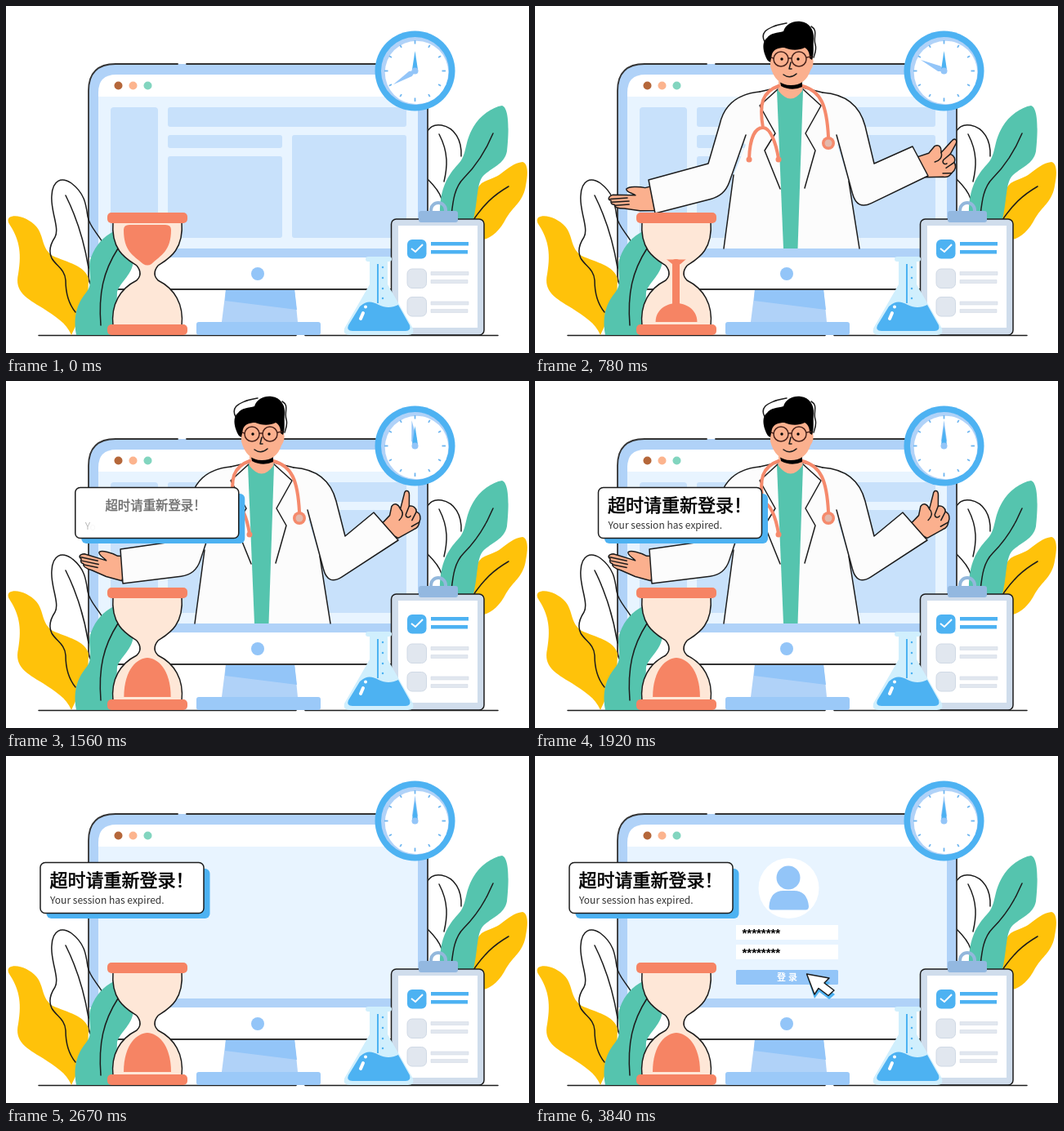
These frames come from a looping animation (640x425 px, 4.5 s). An HTML page:

```html
<!DOCTYPE html>
<html lang="zh">
<head>
<meta charset="utf-8">
<title>Session expired</title>
<style>
html,body{margin:0;width:100%;height:100%;overflow:hidden;background:#fff}
svg{display:block;width:640px;height:425px}
.ink{fill:none;stroke:#1c1c1c;stroke-width:1.5;stroke-linecap:round;stroke-linejoin:round}
.cjk{font-family:"Noto Sans CJK SC","Noto Sans CJK",sans-serif}
.sky{fill:#4db2f2}.soft{fill:#93c5f8}.pale{fill:#b0d2f8}.panel{fill:#c8e1fb}
.teal{fill:#55c4ae}.gold{fill:#ffc20a}.coral{fill:#f68464}.grey{fill:#e1e7ef}
.skin{fill:#fbb08e}
.tube{fill:none;stroke:#f58a6c;stroke-width:4;stroke-linecap:round}
</style>
</head>
<body>
<svg viewBox="0 0 640 425">
<defs>
  <clipPath id="upper"><rect id="level" x="140" y="268" width="70" height="60"/></clipPath>
</defs>

<!-- right plants -->
<path class="ink" d="M516 153C520 146 527 145 533 146C549 149 558 164 557 184M516 212C522 218 530 226 533 236"/>
<path class="ink" d="M530 157C542 180 540 198 536 215"/>
<path class="gold" d="M632 191C639 193 639 205 636 220C633 240 620 246 612 260C605 274 595 284 584 286L566 264C572 240 572 226 582 217C592 211 599 211 606 205C614 199 622 192 632 191Z"/>
<path class="ink" d="M615 221C596 232 584 244 572 262"/>
<path class="teal" d="M607 122C617 125 615 160 613 178C610 194 594 198 584 208C575 218 578 242 571 264L531 258C530 225 540 208 553 194C565 182 560 168 572 148C580 134 595 124 607 122Z"/>
<path class="ink" d="M596 156C586 180 574 197 560 211C549 222 547 238 545 256"/>

<!-- monitor -->
<path class="ink" stroke-linecap="butt" d="M40 403.500H355M366 403.500H602"/>
<path fill="#b0d2f8" d="M264 387L269 347H353L357 387Z"/>
<path class="soft" d="M268 361L269 347H353L356 372Z"/>
<rect fill="#9bc9f8" x="233" y="387" width="152" height="16" rx="3"/>
<path class="pale" d="M101 330V104Q101 71 134 71H483Q516 71 516 104V330Q516 347 499 347H118Q101 347 101 330Z"/>
<path fill="#fff" d="M101 308H516V330Q516 347 499 347H118Q101 347 101 330Z"/>
<path class="ink" style="stroke:#333;stroke-width:1.8" d="M210 71H134Q101 71 101 104V330Q101 347 118 347H499Q516 347 516 330V104Q516 71 483 71H221"/>
<path fill="#fff" d="M113 112V106Q113 84 135 84H482Q504 84 504 106V112Z"/>
<rect fill="#e8f4ff" x="113" y="111" width="391" height="186"/>
<circle cx="137.500" cy="97.500" r="5" fill="#b5673a"/><circle cx="155.500" cy="97.500" r="5" fill="#fcb48e"/><circle cx="173.500" cy="97.500" r="5" fill="#82d5bf"/>
<circle class="soft" cx="308" cy="328" r="8"/>
<g id="panels" class="panel">
  <rect x="128" y="124" width="58" height="160" rx="4"/>
  <rect x="198" y="124" width="292" height="24" rx="3"/>
  <rect x="198" y="158" width="140" height="16" rx="3"/>
  <rect x="198" y="184" width="140" height="100" rx="3"/>
  <rect x="350" y="158" width="140" height="126" rx="3"/>
</g>

<!-- left plants -->
<path class="gold" d="M4 259C12 254 28 260 37 270C47 282 43 297 57 306C75 314 97 318 101 334L100 360L80 403C74 388 60 380 45 370C25 358 10 350 15 328C20 300 15 284 4 267Q1 262 4 259Z"/>
<path class="ink" d="M121 294C112 278 102 270 100 258C98 244 97 230 80 217C68 209 57 213 56 232C54 250 66 272 60 283C54 292 52 301 56 309C62 319 72 322 73 336C73 352 76 364 85 375"/>
<path class="ink" d="M73 232C86 258 96 290 101 321"/>
<path class="teal" d="M132 276C150 268 158 292 156 312C154 330 142 335 136 350L134 403H86C81 376 90 361 98 351C109 338 98 322 104 308C110 292 120 282 132 276Z"/>
<path class="ink" d="M137 297C119 325 113 352 116 391"/>

<!-- doctor -->
<g id="doctor">
  <path fill="#fcfcfc" d="M298 99L275 105Q238 114 228 142L258 170L243 207L231 297H397L384 215L370 170L402 142Q392 116 352 106L327 99Z"/>
  <path class="ink" d="M275 105L297 100M352 106L328 100M243 207L231 297M384 215L397 297"/>
  <path class="teal" d="M296 103H328L321.500 297H304Z"/>
  <g id="handL"></g><g id="handR"></g>
  <path id="armL" class="ink" style="fill:#fcfcfc"/><path id="armR" class="ink" style="fill:#fcfcfc"/>
  <path class="ink" d="M297 102L275 122L294 156L281 177L300 224M328 102L350 122L331 156L343 177L330 223"/>
  <path class="skin" d="M298 86V104Q313 123 327 104V86Z"/>
  <path class="tube" d="M298 98C278 105 274 120 279 149M262 187C263 160 270 149 279 149C288 149 295 168 298 187M327 98C350 104 357 122 359 160"/>
  <circle cx="262" cy="188" r="3.500" fill="#f58a6c"/><circle cx="298" cy="188" r="3.500" fill="#f58a6c"/>
  <circle cx="359" cy="168" r="8" fill="#f58a6c"/><circle cx="359" cy="168" r="4.500" fill="#e3b9ac"/>
  <g id="head">
    <path d="M300 93H327V99Q314 105 301 98Z"/>
    <path class="skin" d="M288 46V74Q294 97 313 97Q331 97 337 79Q342 72 340 64L338 46Z"/>
    <path d="M285 67C280 59 276 45 284 39C288 33 297 33 304 31C307 22 316 18 325 19C336 20 342 30 341 40C340 50 342 57 339 66L336 64C336 57 334 53 330 51C322 55 312 54 305 51C298 51 292 53 290 59L288 69Z"/>
    <path class="ink" d="M281 44C275 32 285 28 292 25C298 22 303 22 308 21M338 25C347 30 340 38 343 47C345 54 342 59 341 63"/>
    <g class="ink" style="stroke:#4a241c"><circle cx="301" cy="65" r="9"/><circle cx="323" cy="65" r="9"/><path d="M310 64H314M332 63L338 62M292 64L289 63"/></g>
    <circle cx="302" cy="65" r="1.700"/><circle cx="322" cy="65" r="1.700"/>
    <path class="ink" d="M313 69L311 77H314M304 84Q312 90 320 83"/>
  </g>
</g>

<!-- hourglass -->
<path class="ink" style="fill:#fee7d7" d="M131 264C128 300 148 310 160 318Q168 328 160 336C140 346 128 365 131 392H215C218 365 206 346 186 336Q178 328 186 318C198 310 218 300 215 264Z"/>
<path class="coral" clip-path="url(#upper)" d="M144 274Q144 268 151 268H195Q202 268 202 274C202 300 190 305 178 316Q173 319 168 316C155 305 144 300 144 274Z"/>
<rect id="stream" class="coral" x="168" width="9" rx="4"/>
<path id="heap" class="coral"/>
<rect class="coral" x="124" y="253" width="98" height="13" rx="5"/><rect class="coral" x="124" y="390" width="98" height="13" rx="5"/>

<!-- clipboard -->
<rect class="ink" style="fill:#d0ddec" x="471.500" y="261" width="113.500" height="142" rx="6"/>
<rect fill="#fff" x="480" y="269" width="97" height="125"/>
<path fill="none" stroke="#93b8dc" stroke-width="4" d="M520 253V250A9 9 0 0 1 538 250V253"/>
<rect fill="#93b8e0" x="505" y="251" width="48" height="14" rx="3"/>
<rect class="sky" x="491" y="286" width="23.500" height="23.500" rx="6"/>
<path fill="none" stroke="#fff" stroke-width="2" d="M496 297L501 301L510 292"/>
<path class="sky" d="M520 289H566V293.500H520ZM520 299H565V303.500H520Z"/>
<g class="grey"><g stroke="#d0d9e5"><rect x="491" y="322" width="23.500" height="23.500" rx="6"/><rect x="491" y="356.500" width="23.500" height="23.500" rx="6"/></g>
<path stroke="#d3dbe6" stroke-width=".6" d="M520 325.500H566V329.500H520ZM520 335.500H565V339.500H520ZM520 362H566V366H520ZM520 371.500H565V375.500H520Z"/></g>

<!-- flask -->
<path fill="#d0effd" d="M443 307H469Q472 307 472 310T469 313H467V341L498 395Q500 403 492 403H421Q412 403 414 395L445 341V313H443Q440 313 440 310T443 307Z"/>
<path class="sky" d="M433 368C442 360 448 362 456 366C464 370 472 370 480 366L494 391Q496 398 489 398H424Q416 398 419 391Z"/>
<path stroke="#4db2f2" stroke-width="2" d="M455 316V364"/>
<path fill="none" stroke="#4db2f2" stroke-width="2.500" stroke-linecap="round" d="M461 320v0M461 333v0M461 346v0M461 358v0"/>
<path stroke="#fff" stroke-width="4" stroke-linecap="round" d="M437 376L434 383"/><circle cx="440" cy="368.500" r="2" fill="#fff"/>

<!-- clock -->
<circle class="sky" cx="500.500" cy="79.500" r="49"/><circle class="pale" cx="500.500" cy="79.500" r="41.500"/><circle cx="502.500" cy="81.500" r="38.800" fill="#fff"/>
<g id="ticks" stroke="#6fb6f0" stroke-width="1.800"></g>
<path id="minute" class="soft" d="M500.500 48L504 73L500.500 81L497 73Z"/>
<path class="sky" d="M500.500 55L504 78L500.500 82L497 78Z"/>
<circle class="soft" cx="500.500" cy="79.500" r="4"/>

<!-- login form -->
<g id="form">
  <circle cx="310.500" cy="162" r="37" fill="#fff"/><circle class="soft" cx="310" cy="149" r="14.500"/>
  <path class="soft" d="M290 188.500Q286 188.500 286.500 184Q288 165 304 165H317Q333 165 335 184Q335 188.500 331 188.500Z"/>
  <path fill="#fff" d="M246 207H371V225H246ZM246 231H371V249H246Z"/>
  <g font-family="Liberation Sans,sans-serif" font-weight="700" font-size="15"><text x="253.500" y="222">********</text><text x="253.500" y="246">********</text></g>
  <rect id="button" x="246" y="262" width="125" height="18" rx="1.500"/>
  <text class="cjk" x="296" y="275" font-size="11" font-weight="700" fill="#fff" letter-spacing="3">登录</text>
</g>
<g id="cursor">
  <path class="sky" d="M333 271L361 277L355 283L367 292L360 298L348 289L342 297Z"/>
  <path class="ink" style="fill:#fff" d="M332.500 267L360 272L354 278L366 287L359 293.500L347 284.500L342 292Z"/>
</g>

<!-- message -->
<g id="bubble">
  <rect class="sky" x="85" y="138" width="200" height="61" rx="6"/>
  <rect class="ink" style="fill:#fff" x="77.500" y="130.500" width="200" height="62" rx="6"/>
  <text id="title" class="cjk" x="89" y="160" font-size="22" font-weight="500" stroke="#000" stroke-width=".6">超时请重新登录！</text>
  <text id="note" class="cjk" x="89.500" y="181" font-size="12" fill="#333"></text>
</g>
</svg>
<script>
const $ = id => document.getElementById(id);
const set = (id, o) => { for (const k in o) $(id).setAttribute(k, o[k]); };
const clamp = x => Math.max(0, Math.min(1, x));
const ramp = (t, a, b) => clamp((t - a) / (b - a));
const mix = (a, b, p) => a + (b - a) * p;
const mixPt = (a, b, p) => [mix(a[0], b[0], p), mix(a[1], b[1], p)];
const smooth = p => p * p * (3 - 2 * p);
const out = p => 1 - (1 - p) * (1 - p);
const LOOP = 4500, STEP = 30;

$('ticks').innerHTML = Array.from({length: 12}, (_, i) =>
  `<path d="M500.5 ${i % 3 ? 43 : 42}V46.5" transform="rotate(${i * 30} 500.5 79.5)"/>`).join('');
$('note').innerHTML = [...'Your session has expired.'].map(c => `<tspan>${c}</tspan>`).join('');
const letters = [...$('note').children];

// hands point along +x from the wrist
const shape = (d, lines) => `<g><path class="ink skin" style="fill:#fbb08e" d="${d}"/><path class="ink" d="${lines}"/></g>`;
const rest = shape('M-6 -14L14 -17C24 -21 36 -22 42 -18C48 -16 48 -10 48 -6C51 0 49 8 43 11L28 13C38 17 38 24 31 24C20 23 8 18 -6 15Z',
  'M31 -12L45 -13M31 -4L48 -5M31 4L47 4M28 13L20 10');
const open = shape('M-5 14L8 11C16 13 28 13 31 10C32 6 24 5 20 2L48 3C54 1 54 -3 50 -4C51 -8 48 -9 46 -9C46 -13 40 -14 34 -14L15 -17L-5 -17Z',
  'M30 -1L51 -2M28 -5L49 -6M28 -9L45 -10');
const point = shape('M-6 -8L14 -2L25 -5C31 -4 31 1 27 6L45 2C51 0 53 5 47 8L35 14C38 18 37 23 33 25C33 30 29 34 23 34C18 36 14 34 12 32L-6 20Z',
  'M14 11C20 13 25 12 27 6M35 14L24 15C20 17 22 21 25 21M33 25L21 25M23 34L14 28');
$('handL').innerHTML = `<g transform="scale(1 -1)">${rest}</g>` + open;
$('handR').innerHTML = rest + point;

// poses: [outer elbow, outer cuff, inner cuff, inner elbow, hand angle]
const arms = {
  L: { top: [275, 105], ctl: [234, 109], side: [226, 145], pit: [258, 158], poses: [
    [[205, 217], [188, 289], [235, 297], [246, 223], 103],
    [[212, 193], [139, 213], [147, 254], [232, 232], 179],
    [[217, 195], [140, 206], [143, 248], [232, 237], 195]] },
  R: { top: [352, 106], ctl: [394, 109], side: [404, 147], pit: [369, 158], poses: [
    [[422, 217], [441, 289], [395, 297], [383, 223], 78],
    [[415, 193], [462, 172], [481, 208], [394, 250], -35],
    [[415, 190], [450, 161], [480, 195], [394, 251], -63]] }
};

// turns a point around its moving pivot instead of cutting across
function swing(p0, c0, p1, c1, k) {
  const [x0, y0, x1, y1] = [p0[0] - c0[0], p0[1] - c0[1], p1[0] - c1[0], p1[1] - c1[1]];
  const a = mix(Math.atan2(y0, x0), Math.atan2(y1, x1), k);
  const r = mix(Math.hypot(x0, y0), Math.hypot(x1, y1), k);
  const c = mixPt(c0, c1, k);
  return [c[0] + r * Math.cos(a), c[1] + r * Math.sin(a)];
}

function drawArm(side, t) {
  const { top, ctl, side: edge, pit, poses } = arms[side];
  const late = t >= 780;
  const k = late ? out(ramp(t, 780, 1050)) : Math.pow(ramp(t, 480, 780), 1.3);
  const a = poses[late ? 1 : 0], b = poses[late ? 2 : 1];
  const elbow = mixPt(a[0], b[0], k), inner = mixPt(a[3], b[3], k);
  // the late change is small and needs no turning
  const [co, ci] = late
    ? [mixPt(a[1], b[1], k), mixPt(a[2], b[2], k)]
    : [swing(a[1], a[0], b[1], b[0], k), swing(a[2], a[3], b[2], b[3], k)];
  set('arm' + side, { d: `M${top}Q${ctl} ${edge}L${elbow}L${co}L${ci}L${mixPt(inner, ci, .2)}Q${inner} ${mixPt(inner, pit, .22)}L${pit}` });
  const mid = mixPt(co, ci, .5);
  set('hand' + side, { transform: `translate(${mid}) rotate(${mix(a[4], b[4], k)})` });
  const swap = ramp(t, 540, 660), [down, up] = $('hand' + side).children;
  down.setAttribute('opacity', 1 - swap);
  up.setAttribute('opacity', swap);
}

function drawSand(t) {
  set('level', { y: 268 + t * .0545 });
  const run = Math.max(0, t - 90);
  const h = Math.min(48, run * .0335), w = 29 * (1 - Math.exp(-run / 330));
  const l = 173 - w, r = 173 + w, y = 387 - h, s = 387 - h * .72;
  set('heap', { d: `M${l} 387C${l} ${s} ${173 - w * .4} ${y} 173 ${y}C${173 + w * .4} ${y} ${r} ${s} ${r} 387Z` });
  const from = 310 + Math.max(0, t - 880) * .2;
  const to = Math.min(312 + t * .11, y + 5);
  set('stream', { y: from, height: t > 30 ? Math.max(0, to - from) : 0 });
}

function drawBubble(t) {
  const x = 40 * (1 - ramp(t, 1290, 1620)) - 35.5 * smooth(ramp(t, 2360, 2660));
  set('bubble', { transform: `translate(${x} 0)`, opacity: ramp(t, 1290, 1470) });
  const p = ramp(t, 1440, 1650), s = .3 + .7 * p;
  set('title', { transform: `translate(173 152) scale(${s}) translate(-173 -152)`, opacity: p });
  let prev = 0;
  letters.forEach((el, i) => {
    const q = ramp(t, 1545 + i * 13.5, 1590 + i * 13.5), y = 2 * (1 - q);
    el.setAttribute('fill-opacity', q);
    el.setAttribute('dy', y - prev);
    prev = y;
  });
}

function draw(t) {
  set('doctor', { opacity: ramp(t, 0, 560) * (1 - ramp(t, 2250, 2670)) });
  set('head', { transform: `translate(0 ${-5.5 * (1 - smooth(ramp(t, 400, 600)))})` });
  drawArm('L', t);
  drawArm('R', t);
  drawSand(t);
  drawBubble(t);
  set('minute', { transform: `rotate(${Math.min(360, 238 + t * .0735)} 500.5 79.5)` });
  set('panels', { opacity: 1 - ramp(t, 2340, 2670) });
  set('form', { opacity: ramp(t, 2790, 3060) });
  const c = ramp(t, 2970, 3300), far = 1 - out(c);
  set('cursor', { transform: `translate(${40 * far} ${2 * far})`, opacity: clamp(c * 3) });
  set('button', { fill: t >= 3480 && t < 3840 ? '#4db2f2' : '#93c5f8' });
}

const start = performance.now();
function tick() {
  const t = (performance.now() - start) % LOOP;
  draw(Math.floor(t / STEP) * STEP);
  requestAnimationFrame(tick);
}
draw(0);
requestAnimationFrame(tick);
</script>
</body>
</html>
```
